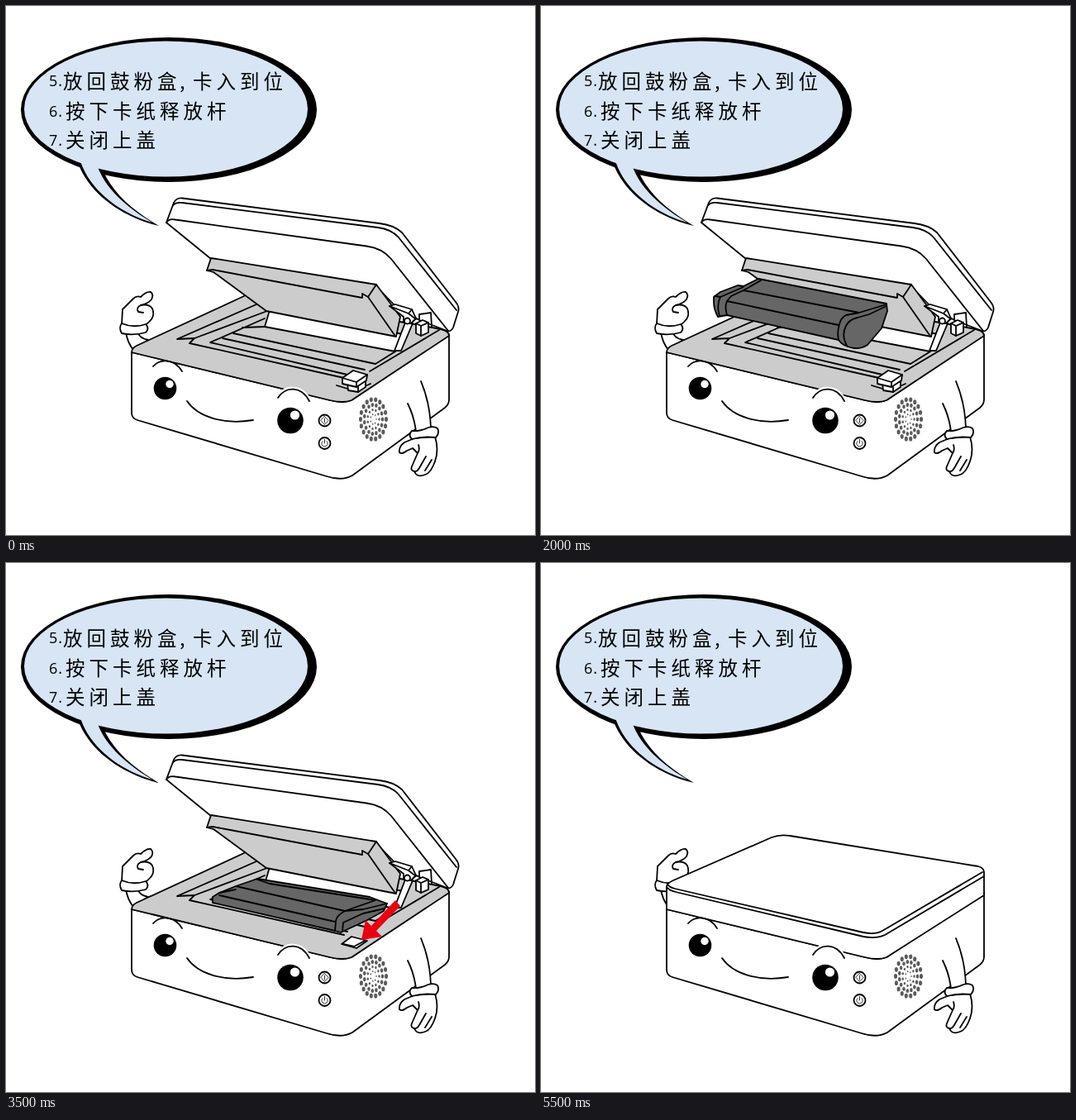
These frames come from a looping animation (640x640 px, 7500 ms). An HTML page:

```html
<!DOCTYPE html>
<html lang="zh">
<head>
<meta charset="utf-8">
<title>放回鼓粉盒</title>
<style>
html, body { margin: 0; width: 100%; height: 100%; overflow: hidden; background: #fff; }
svg { display: block; width: 100vw; height: 100vh; }
.ink { stroke: #000; stroke-width: 1.8; stroke-linejoin: round; stroke-linecap: round; fill: none; }
.white { fill: #fff; }
.grey { fill: #ccc; }
.dark { fill: #666; }
.bare { stroke: none; }
.halo { stroke: #fff; stroke-width: 6; }
.fine { stroke-width: .8; }
text { font-family: "Noto Sans CJK SC", "Noto Sans CJK", sans-serif; font-size: 23.5px; letter-spacing: 5px; fill: #000; }
.num { font-family: "Open Sans", sans-serif; font-size: 18px; letter-spacing: 1px; }
</style>
</head>
<body>
<svg viewBox="0 0 640 640">
  <rect width="640" height="640" fill="#fff"/>

  <!-- speech bubble -->
  <g>
    <ellipse cx="197" cy="125.5" rx="179" ry="87.5"/>
    <path d="M86 186C97 224 138 255 185 266C152 247 128 224 118 200Z"/>
    <g fill="#d7e5f5">
      <ellipse cx="193.5" cy="124.5" rx="171.5" ry="82"/>
      <path d="M89 184C99 221 136 250 177 262C145 243 121 221 111 195L112 186Z"/>
    </g>
    <path id="tip" class="ink fine" d="M184 265L188.5 267"/>
    <text class="num" x="52" y="97">5.</text>
    <text x="69" y="100">放回鼓粉盒<tspan x="210">,</tspan><tspan x="226">卡入到位</tspan></text>
    <text class="num" x="52" y="134">6.</text>
    <text x="72" y="136">按下卡纸释放杆</text>
    <text class="num" x="52" y="169">7.</text>
    <text x="72" y="171">关闭上盖</text>
  </g>

  <!-- raised hand -->
  <g class="ink">
    <path class="white" d="M145 395Q147 407 154 416L172 404Q162 402 160 396Z"/>
    <path class="white" d="M140 385L141 367L154 354Q158 350 163 352Q170 345 175 346Q179 349 176 355Q172 360 163 362Q173 360 177 366Q180 373 176 379Q172 384 167 387Q152 391 140 385Z"/>
    <path d="M163 362Q157 365 160 370L166 371"/>
    <path class="white" d="M140 384Q136 389 140 396Q154 399 169 395Q174 390 169 385Q154 390 140 384Z"/>
  </g>

  <!-- body -->
  <path class="ink white" d="M152 419L152 492Q152 499 159 501L388 569Q406 575 419 568L531 486Q536 482 536 476L536 398L418 477Q408 481 392 477Z"/>

  <g id="open" class="ink">
    <path class="grey" d="M152 419Q152 414 158 411L290 350L500 386L526 391Q536 393 536 399L418 477Q408 481 392 477Z"/>
    <path class="white" d="M319 368L313 388L471 418L486 398Z"/>
    <path d="M303 361L207 403L228 402L222 408L409 450M316 369L228 402M313 378L247 407L413 446M275 396L447 433L471 418M262 402L434 440M286 389L313 388M440 442L524 392"/>
    <path class="white" d="M194 262L203 238Q206 232 213 232.500L452 263Q469 265 479 274L544 358Q549 364 547 370L541 389Q538 396 531 392L500 380L470 362L447 338L248 306Z"/>
    <path d="M202 241Q206 237 213 238L450 268Q466 270 475 280L545 368M194 262Q197 257 205 258.500L436 290.500Q455 293 466 306L535 393"/>
    <path class="grey" d="M248 305L448 337L477 376L472 400L315 369L251 322L243 320Z"/>
    <path d="M243 320L250 319L431 353L431 348L438 352L470 398M438 352L448 337"/>

    <!-- hinge -->
    <path class="white" d="M483 383L470 417L478 417L492 384Z"/>
    <path class="white" d="M464 363L471 361L491 367L496 378L490 384L481 382L481 376Z"/>
    <path d="M464 363L487 372L496 379M487 372L491 367"/>
    <circle class="white" cx="485.5" cy="381" r="3.5"/>
    <path d="M500 379L500 373L514 371L515 388"/>
    <path class="white" d="M496 384L504 380L511 383L511 395L502 399L496 396Z"/>
    <path d="M496 384L502 387L511 383M502 387L502 399"/>

    <g id="seated">
      <path class="dark" d="M250 411L250 404L258 399L278 391L304 382L440 404L461 412L457 421L437 432L405 447L398 445Z"/>
      <path d="M278 391L410 421L432 419L461 412M258 402L398 434M304 383L319 388L447 408L410 421Q399 427 399 434L398 445M407 446L408 435L432 424L458 418M258 399L278 395"/>
    </g>
    <g id="leverUp">
      <path d="M400 459L413 463M432 461L441 457"/>
      <path class="white" d="M413 456L414 465L426 467L435 461L435 452Z"/>
      <path class="white" d="M407 450L420 441L437 446L436 453L424 461L407 457Z"/>
      <path d="M407 450L424 455L437 446M424 455L424 461M426 461L426 467"/>
    </g>
    <g id="leverDown">
      <path class="white" d="M406 461L418 452L437 457L424 466Z"/>
      <path d="M408 461L421 464L434 457"/>
    </g>
  </g>

  <g id="cartridge" class="ink">
    <path class="dark" d="M104 299L112 293L133 285L140 286L158 277L313 307L314 316L307 337L290 357Q282 362 274 361Q260 359 255 351L120 321L109 323Q104 314 104 305Z"/>
    <path d="M105 298L112 299L140 287M112 299Q107 309 111 322M120 321Q117 311 120 304L125 298L140 291L161 279M140 291L280 318L313 308M120 304L255 333M255 351Q253 341 256 332Q258 324 264 321L280 318M265 358Q258 345 264 334Q268 326 278 324L292 320L313 310"/>
  </g>
  <path id="arrow" fill="#e60012" d="M430 456L435 432L442 439L471 408L477 415L448 445L455 452Z"/>

  <g id="closed" class="ink">
    <path class="white" d="M152 419L152 391Q153 387 160 384L279 332Q289 328 301 330L529 367Q536 369 536 374L536 402L418 477Q408 481 392 477Z"/>
    <path d="M153 388Q154 392 162 394L390 447Q404 450 413 445L534 374M153 393Q155 396 163 398L390 452Q405 455 416 450L536 379"/>
  </g>

  <!-- face -->
  <g class="ink">
    <path class="white halo" d="M329 474C338 460 357 459 367 478"/>
    <path d="M178 436C187 426 204 427 213 442M329 474C338 460 357 459 367 478M219 478C232 497 263 507 299 501"/>
  </g>
  <circle cx="192.5" cy="462.5" r="13.8"/>
  <circle cx="198" cy="457.5" r="4.7" fill="#fff"/>
  <circle cx="344" cy="501.5" r="15.8"/>
  <circle cx="349.5" cy="495" r="5.6" fill="#fff"/>

  <!-- buttons and speaker -->
  <g class="ink">
    <circle cx="385.5" cy="501.5" r="7"/>
    <circle cx="385.5" cy="529" r="7"/>
    <path class="fine" d="M385.5 496.5L390 501.5L385.5 506.5L381 501.5ZM385.5 499L385.5 504"/>
    <path class="fine" d="M383 526.5A3.7 3.7 0 1 0 388 526.5M385.5 524.5L385.5 529"/>
  </g>
  <g id="speaker" fill="#5c5c5c"></g>

  <!-- lowered arm -->
  <g class="ink">
    <path class="white bare" d="M502 454Q513 480 514 512L496 516Q494 497 486 481Z"/>
    <path d="M502 454Q513 480 514 511M486 481Q494 497 496 515"/>
    <path class="white" d="M494 523L482 528Q475 533 476 540Q479 543 485 538L492 535L498 541L491 557Q489 562 494 563Q497 571 507 567Q514 565 519 551Q524 537 519 521Z"/>
    <path d="M498 541Q501 537 499 531M508 545L500 559Q497 564 494 563M515 549L507 562"/>
    <path class="white" d="M491 514Q486 519 491 524Q505 520 520 522Q525 517 522 511Q518 508 511 510Q500 515 491 514Z"/>
  </g>
</svg>
<script>
const $ = id => document.getElementById(id);
const LOOP = 7500;
// [start, dx, dy] of the cartridge on its way in
const steps = [[1000, 0, 0], [1500, 65, 29], [2000, 105, 53], [2500, 125, 77]];

function show(id, on) {
  $(id).style.display = on ? "" : "none";
}

function buildSpeaker() {
  // [rx, ry, dots, dot size]
  const rings = [[15.5, 24, 18, 2.4], [11, 17.5, 15, 2.1], [7, 11.5, 11, 1.4], [3.5, 6, 7, 0.9]];
  let dots = "";
  for (const [rx, ry, count, size] of rings) {
    for (let i = 0; i < count; i++) {
      const a = i / count * 2 * Math.PI;
      const x = 444.5 + rx * Math.cos(a), y = 500 + ry * Math.sin(a);
      dots += `<ellipse cx="${x}" cy="${y}" rx="${size * 0.85}" ry="${size * 1.2}"/>`;
    }
  }
  $("speaker").innerHTML = dots;
}

function draw(t) {
  const within = (a, b) => t >= a && t < b;
  const moving = within(1000, 3000);
  show("cartridge", moving);
  if (moving) {
    const [, dx, dy] = steps.filter(s => t >= s[0]).pop();
    $("cartridge").setAttribute("transform", `translate(${dx} ${dy})`);
  }
  show("open", t < 5500);
  show("closed", t >= 5500);
  show("seated", t >= 3000);
  show("leverUp", t < 3500);
  show("leverDown", t >= 3500);
  show("arrow", within(3500, 4000) || within(4500, 5000));
  show("tip", within(3000, 3500));
}

function tick() {
  draw(performance.now() % LOOP);
  requestAnimationFrame(tick);
}

buildSpeaker();
tick();
</script>
</body>
</html>
```
